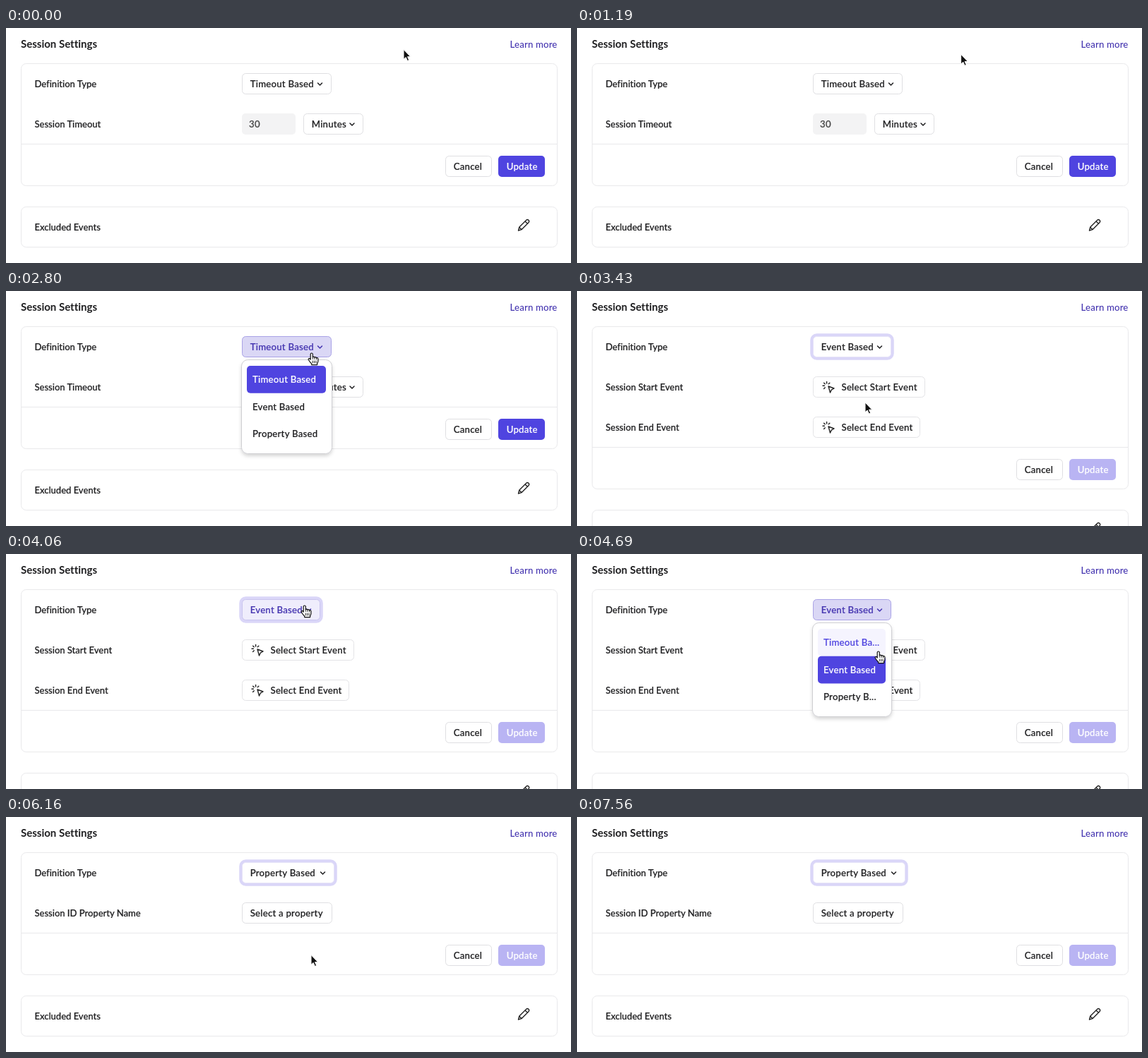
An HTML page for the animation above (7.91 s loop, 800 by 333 pixels).

```html
<!DOCTYPE html>
<html lang="en">
<head>
<meta charset="utf-8">
<title>Session Settings</title>
<style>
  html, body { margin: 0; width: 100%; height: 100%; overflow: hidden; background: #fff; }
  svg { display: block; width: 800px; height: 333px; }
  text {
    font: 500 13.2px Lato, sans-serif; font-variant-ligatures: none; letter-spacing: .24px;
    fill: currentColor; stroke: currentColor; stroke-width: .2px; white-space: pre;
  }
  .label { font-size: 13px; letter-spacing: 0; }
  .title { font-weight: 700; font-size: 15px; letter-spacing: 0; stroke: none; }
  .link { letter-spacing: .15px; stroke: none; }
  .line { fill: none; stroke: #222; stroke-width: 1.4; stroke-linecap: round; stroke-linejoin: round; }
</style>
</head>
<body>
<svg id="stage" viewBox="0 0 800 333">
  <defs>
    <filter id="shadow" x="-20%" y="-20%" width="140%" height="140%">
      <feDropShadow dx="0" dy="3" stdDeviation="2.5" flood-color="#000" flood-opacity=".16"/>
    </filter>
    <g id="click" class="line">
      <path d="M8 7 16 10 12.2 12.2 10.5 16Z M5.6 0.5V3 M1.6 2.2 3.2 3.8 M0 6.2H2.4 M3.2 8.8 1.6 10.4 M8.2 3.8 9.8 2.2"/>
    </g>
    <g id="pencil" class="line">
      <path d="M1 16.5 2.2 11.8 12.2 1.8Q13.8 .3 15.4 1.8T15.4 5.2L5.4 15.2Z M10.6 3.5 13.8 6.7 M2.4 11.9 5.3 14.9"/>
    </g>
  </defs>
  <g id="page"></g>
  <g id="menu"></g>
  <path id="arrow" d="M0 0V13.8L3.2 11 5.4 16 7.7 15 5.5 10.2H9.8Z" fill="#111" stroke="#fff"/>
  <g id="hand" fill="#fff" stroke="#111" stroke-linejoin="round" stroke-linecap="round">
    <path d="M-1.8 9V1.4Q-1.6 0 -.3 0T1.3 1.4V5.6Q2.7 4.6 3.9 6 5.4 5.2 6.5 6.7 8.6 6.2 8.9 8.3V11.5Q8.6 13.4 7.6 14.6V16.6H-.3V15Q-2.6 13 -4.8 9.2 -5.2 7.3 -3.3 7.5Z" stroke-width="1.2"/>
    <path d="M1.3 5.6V8.4 M3.9 6V8.6 M6.5 6.7V8.9 M1.3 11V14 M3.7 11V14 M6 11V14" stroke-width=".9"/>
  </g>
</svg>
<script>
const LOOP = 7910, STEP = 70, LAST = 7560;
const INK = '#1f1f21', VIOLET = '#4f44e0', DEEP = '#4434b0', RULE = '#e9e9eb';
const $ = id => document.getElementById(id);

const MODES = [
  { name: 'Timeout Based', w: 127, items: ['Timeout Based', 'Event Based', 'Property Based'] },
  { name: 'Event Based', w: 111, items: ['Timeout Ba...', 'Event Based', 'Property B...'] },
  { name: 'Property Based', w: 131 }
];

// Start time, mode and look of the type selector
const STATES = [
  [0, 0, 'idle'], [1540, 0, 'hover'], [1890, 0, 'press'], [2030, 0, 'open'],
  [3430, 1, 'focus'], [3990, 1, 'over'], [4270, 1, 'open'], [5320, 2, 'focus']
];
const LOOKS = {
  idle:  { fill: '#fff', edge: '#dfdfe2', ink: INK },
  hover: { fill: '#faf9ff', edge: '#dcd9f2', ink: DEEP },
  press: { fill: '#fdfdff', edge: '#e6e3f8', ink: DEEP, ring: true },
  open:  { fill: '#dad7f5', edge: '#a9a2e6', ink: DEEP, open: true },
  focus: { fill: '#fff', edge: '#e6e3f8', ink: INK, ring: true },
  over:  { fill: '#efedfc', edge: '#c9c4ee', ink: DEEP, ring: true }
};

// Time, x, y of the pointer tip
const PATH = [
  [1050, 563, 30.5], [1610, 439, 74], [1960, 436, 72], [2380, 436, 74], [2800, 433, 88],
  [3360, 408, 158], [3640, 408, 158], [4060, 423, 73], [4270, 423, 73], [4690, 427, 138],
  [5110, 424, 196], [5460, 424, 195.5], [5600, 432, 195.5], [6790, 432, 195.5], [7210, 500, 345]
];

// Box with its outer edge on the given bounds, with or without an outline
function rect(x, y, w, h, r, fill, edge, more = '') {
  const d = edge ? .5 : 0;
  return `<rect x="${x + d}" y="${y + d}" width="${w - 2 * d}" height="${h - 2 * d}" rx="${r}"
    fill="${fill}" stroke="${edge || 'none'}" ${more}/>`;
}
const text = (x, mid, s, ink = INK, more = '') =>
  `<text x="${x}" y="${mid + 4.6}" color="${ink}" ${more}>${s}</text>`;
const label = (mid, s) => text(40.5, mid, s, INK, 'class="label"');
const chevron = (x, y, ink) =>
  `<path class="line" style="stroke:${ink};stroke-width:1.5" d="M${x - 3} ${y - 1.5}l3 3 3-3"/>`;
const button = (x, y, w, s, fill = '#fff', edge = '#dfdfe2', ink = INK) =>
  rect(x, y, w, 30, 5, fill, edge) + text(x + 11.7, y + 15, s, ink);
const eventButton = (y, w, s) =>
  rect(334, y, w, 30, 5, '#fff', '#e3e3e6') +
  `<use href="#click" x="348" y="${y + 7}"/>` + text(374.5, y + 15, s);

function selector({ name, w }, look) {
  const ring = look.ring
    ? `<rect x="332.5" y="62.5" width="${w + 3}" height="33" rx="7" fill="none" stroke="#dad6f8" stroke-width="4.5"/>` : '';
  return ring + button(334, 64, w, name, look.fill, look.edge, look.ink) +
    chevron(334 + w - 16.5, 79.5, look.ink);
}

const FIELDS = [
  () => label(136, 'Session Timeout') + rect(334, 121, 76, 30, 5, '#f3f3f4') +
    text(344, 136, '30', '#444') + button(421, 121, 85, 'Minutes') + chevron(490, 136.5, INK),
  () => label(136, 'Session Start Event') + eventButton(121, 159, 'Select Start Event') +
    label(193, 'Session End Event') + eventButton(178, 152, 'Select End Event'),
  () => label(136, 'Session ID Property Name') + button(334, 121, 128, 'Select a property')
];

function page(mode, look) {
  const dy = mode === 1 ? 57 : 0;
  return text(21, 23.5, 'Session Settings', INK, 'class="title"') +
    text(780.5, 23.5, 'Learn more', DEEP, 'class="link" text-anchor="end"') +
    rect(21, 50, 760, 174 + dy, 7, '#fff', RULE) +
    `<path d="M22 ${164.5 + dy}H780" stroke="${RULE}"/>` +
    label(79, 'Definition Type') + selector(MODES[mode], look) + FIELDS[mode]() +
    button(622, 181 + dy, 66, 'Cancel') +
    button(697, 181 + dy, 66, 'Update', mode ? '#b9b4f3' : VIOLET, '', '#fff') +
    rect(21, 253 + dy, 760, 58, 7, '#fff', RULE) +
    label(282 + dy, 'Excluded Events') +
    `<use href="#pencil" x="724.5" y="${270.5 + dy}"/>`;
}

function menu(mode, hot) {
  const { w, items } = MODES[mode];
  return rect(333, 97, w + 2, 134, 9, '#fff', '#cfcfd3', 'filter="url(#shadow)"') +
    items.map((s, i) => {
      const y = 106 + i * 38.7, on = i === mode, over = i === hot;
      const fill = on ? VIOLET : over ? '#f5f4fe' : 'none';
      return rect(341, y, w - 15, 38.7, 5, fill) +
        text(349, y + 19.3, s, on ? '#fff' : over ? VIOLET : INK);
    }).join('');
}

function pointer(t) {
  const i = PATH.findIndex(p => p[0] > t);
  if (i < 1) return PATH.at(i).slice(1);
  const [t0, x0, y0] = PATH[i - 1], [t1, x1, y1] = PATH[i];
  const u = (t - t0) / (t1 - t0), k = u * u * (3 - 2 * u);
  return [x0 + (x1 - x0) * k, y0 + (y1 - y0) * k];
}

function put(id, html) {
  const el = $(id);
  if (el.shown !== html) el.innerHTML = el.shown = html;
}

function draw(t) {
  const [, mode, name] = STATES.findLast(s => s[0] <= t), look = LOOKS[name];
  const [x, y] = pointer(t);
  put('page', page(mode, look));
  put('menu', look.open ? menu(mode, Math.floor((y - 106) / 38.7)) : '');
  const hand = name !== 'idle' && name !== 'focus';
  for (const id of ['arrow', 'hand']) {
    $(id).setAttribute('transform', `translate(${x} ${y})`);
    $(id).style.display = hand === (id === 'hand') ? '' : 'none';
  }
}

const start = performance.now();
function tick() {
  const t = (performance.now() - start) % LOOP;
  draw(Math.min(LAST, Math.floor(t / STEP) * STEP));
  requestAnimationFrame(tick);
}
tick();
</script>
</body>
</html>
```
